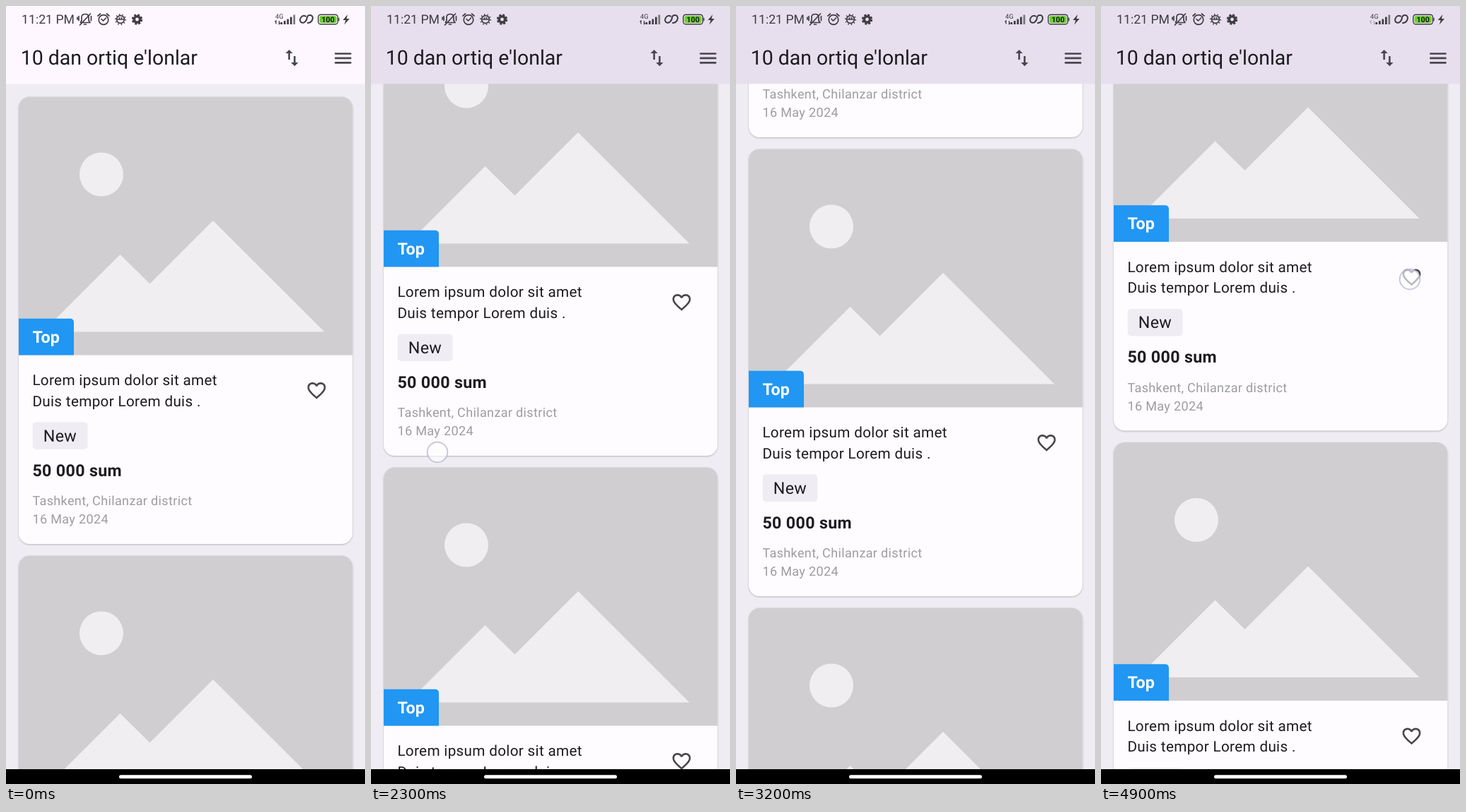
An HTML page that plays this animation: 508 by 1102 pixels, repeating every 5000 ms.

```html
<!DOCTYPE html>
<html lang="uz">
<head>
<meta charset="utf-8">
<style>
  html, body { margin: 0; width: 100%; height: 100%; overflow: hidden; background: #efecf4; }
  svg { display: block; }
  text { font-family: Roboto, sans-serif; fill: #1d1b20; text-rendering: geometricPrecision; white-space: pre; }
  .card { filter: drop-shadow(0 1.4px 1px rgba(0, 0, 0, .24)); }
  .card text { letter-spacing: .32px; }
  .body { font-size: 20.7px; }
  .chip { font-size: 23.27px; }
  .bold { font-size: 23.27px; font-weight: 700; }
  .card .top { fill: #fff; letter-spacing: 0; }
  .card .muted { font-size: 18.1px; fill: #9e9c9f; }
  .icon { fill: #49454f; }
  .line { fill: none; stroke: #3f3c43; stroke-width: 1.7; stroke-linecap: round; stroke-linejoin: round; }
</style>
</head>
<body>
<svg width="508" height="1102" viewBox="0 0 508 1102">
  <defs>
    <clipPath id="round"><rect x="18" y="128.5" width="472.3" height="633.5" rx="15.5"/></clipPath>
    <g id="card" class="card">
      <g clip-path="url(#round)">
        <path fill="#fefcff" d="M18 128h473v635H18z"/>
        <path fill="#d0ced1" d="M18 128h473v366.5H18z"/>
        <g fill="#f0eef1">
          <circle cx="135" cy="238.5" r="31"/>
          <path d="M52 461.5L161.5 352l42 41.5L293 304l157.5 157.5z"/>
        </g>
        <path fill="#2196f3" d="M18 442.8h72.5q5.5 0 5.5 5.5v46.2H18z"/>
      </g>
      <text class="bold top" x="37.5" y="476.8">Top</text>
      <text class="body" x="37.4" y="537.3">Lorem ipsum dolor sit amet</text>
      <text class="body" x="37.4" y="566.9">Duis tempor Lorem duis .</text>
      <path class="icon" transform="translate(424 529.2) scale(1.293)" d="M16.5 3c-1.74 0-3.41.81-4.5 2.09C10.91 3.81 9.24 3 7.5 3 4.42 3 2 5.42 2 8.5c0 3.78 3.4 6.86 8.55 11.54L12 21.35l1.45-1.32C18.6 15.36 22 12.28 22 8.5 22 5.42 19.58 3 16.5 3zm-4.4 15.55l-.1.1-.1-.1C7.14 14.24 4 11.39 4 8.5 4 6.5 5.5 5 7.5 5c1.54 0 3.04.99 3.57 2.36h1.87C13.46 5.99 14.96 5 16.5 5c2 0 3.5 1.5 3.5 3.5 0 2.89-3.14 5.74-7.9 10.05z"/>
      <rect x="37.7" y="589.5" width="77.8" height="38.5" rx="5" fill="#efedf3"/>
      <text class="chip" x="52.8" y="616.8">New</text>
      <text class="bold" x="37.4" y="665.5">50 000 sum</text>
      <text class="muted" x="37.4" y="707">Tashkent, Chilanzar district</text>
      <text class="muted" x="37.4" y="733">16 May 2024</text>
    </g>
  </defs>

  <rect width="508" height="1102" fill="#efecf4"/>
  <g id="list">
    <use href="#card"/>
    <use href="#card" y="650"/>
    <use href="#card" y="1300"/>
  </g>

  <rect id="bar" width="508" height="110.3"/>
  <text x="20.7" y="83" font-size="28.47">10 dan ortiq e'lonlar</text>
  <path class="icon" transform="translate(389 58) scale(1.293)" d="M16 17.01V10h-2v7.01h-3L15 21l4-3.99h-3zM9 3L5 6.99h3V14h2V6.99h3L9 3z"/>
  <path class="icon" transform="translate(461.4 58.4) scale(1.293)" d="M3 18h18v-2H3zm0-5h18v-2H3zm0-7v2h18V6z"/>

  <!-- status bar -->
  <text x="22" y="25.4" font-size="17.7" style="fill:#3f3c43">11:21 PM</text>
  <g class="line">
    <path d="M105.500 23.500h13.500l-2-3v-4.500q0-4.500-5-4.500t-5 4.500v4.500zM110.500 26h3M104.500 27L119.500 11M103 14.500v6M101 16v3M120.500 14.500v6"/>
    <circle cx="138" cy="19.500" r="6.800"/>
    <path d="M130 14l3.500-3M146 14l-3.500-3M135 18.500l2.500 2.500 4-4"/>
    <circle cx="162" cy="19" r="5.400"/>
    <circle cx="162" cy="19" r="7.200" stroke-dasharray="1.500 3.024" stroke-linecap="butt"/>
    <path d="M158 19h8M160.500 16.500v1M163.500 16.500v1"/>
    <circle cx="185.500" cy="19" r="4.200" stroke-width="3.600"/>
    <circle cx="185.500" cy="19" r="6.500" stroke-width="2.400" stroke-dasharray="3 2.105" stroke-linecap="butt"/>
    <path stroke-width="2" d="M424 14.500q-4-2-6.500 1.500t-.5 6.500q3 2.500 6 0t3-6.500q1-3.500 4.500-3t3.500 4.500q-1 6-7 6.500"/>
    <rect x="441.800" y="12.300" width="27.700" height="13.400" rx="3.500" stroke-width="1.400"/>
  </g>
  <text x="381" y="17.6" font-size="9.3" style="fill:#3f3c43">4G</text>
  <path id="data" fill="none" stroke="#3f3c43" stroke-width="1.3" d="M382 25.500v-4.500l-1.500 1.500M386.500 21v4.500l1.500-1.500"/>
  <path fill="#3f3c43" d="M388.500 23h2.700v3h-2.700zM393 21h2.700v5H393zM397.500 18.500h2.700v7.500h-2.700zM402 15.500h2.700v10.500H402z"/>
  <path fill="#77747b" d="M406.500 12.500h2.700v13.500h-2.700z"/>
  <rect x="443.600" y="14.100" width="24.100" height="9.800" rx="2" fill="#6cd12e"/>
  <path fill="#3f3c43" d="M470.300 16.800h1.400v4.400h-1.400zM483.500 12l-6.800 8h4l-2 6.500 7.300-8.500h-4.200z"/>
  <text x="455.700" y="22.900" font-size="10.800" font-weight="700" text-anchor="middle">100</text>

  <circle id="touch" r="14.300" fill="#fff" fill-opacity=".62" stroke="#b6b6d6" stroke-opacity=".75" stroke-width="2"/>

  <path d="M0 1081h508v21H0z"/>
  <rect x="160" y="1089.300" width="188" height="5" rx="2.500" fill="#fff"/>
</svg>
<script>
const STEP = 100, LOOP = 5000, START = 19;
const $ = id => document.getElementById(id);

// list offset at each step from START on
const scroll = [0, 0, 7, 65, 125, 200, 275, 330, 373, 402, 430, 490,
                542, 576, 596, 606, 612, 621, 644, 696, 742, 777, 799, 810.5];

// finger positions: first step, then one point per step
const drags = [
  [19, [[99, 796], [98, 783], [97, 750], [95, 692], [94, 632], [95, 565]]],
  [28, [[118, 745], [120, 693], [123, 633], [126, 581]]],
  [35, [[127, 690], [129, 656], [131, 629], [134, 577]]],
  [49, [[437, 387]]]
];

const mix = (a, b, k) => `rgb(${a.map((v, i) => Math.round(v + (b[i] - v) * k))})`;

function finger(step) {
  for (const [first, points] of drags) {
    if (points[step - first]) return points[step - first];
  }
}

function draw(now) {
  const step = Math.floor(now % LOOP / STEP);
  const i = Math.max(0, Math.min(step - START, scroll.length - 1));
  $('list').setAttribute('transform', `translate(0 ${-scroll[i]})`);

  const tint = Math.max(0, Math.min(1, (step - 20.5) / 2));
  $('bar').setAttribute('fill', mix([254, 247, 255], [231, 223, 238], tint));
  $('data').setAttribute('opacity', step < 33 ? 1 : .35);

  const at = finger(step);
  $('touch').style.display = at ? '' : 'none';
  if (at) $('touch').setAttribute('transform', `translate(${at})`);
  requestAnimationFrame(draw);
}
draw(performance.now());
</script>
</body>
</html>
```
